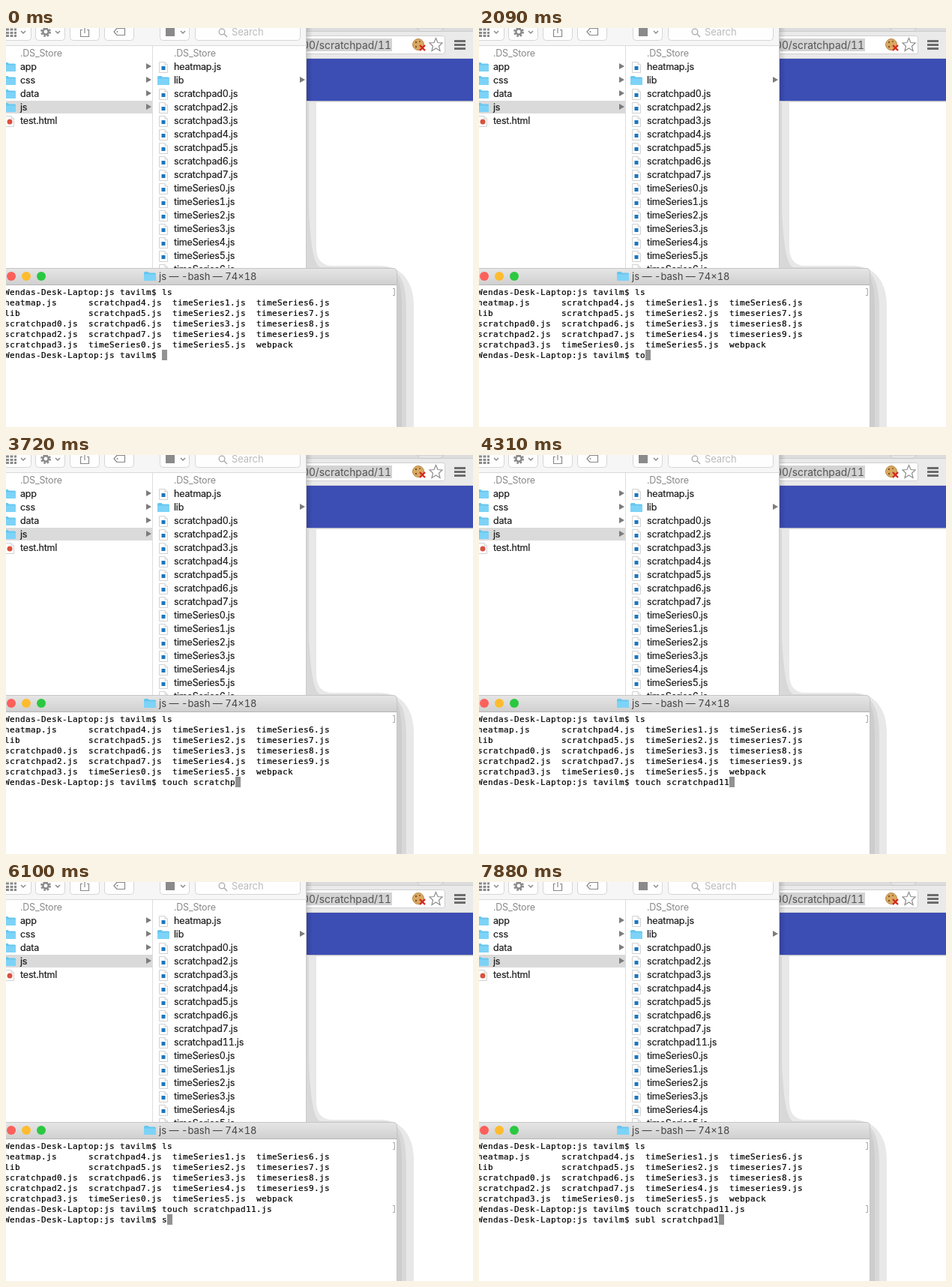
An HTML page that plays this animation: 623 px wide and 532 px high, repeating every 8000 ms.

```html
<!DOCTYPE html>
<html lang="en">
<head>
<meta charset="utf-8">
<title>Creating a file from the terminal</title>
<style>
  html, body { margin: 0; width: 100%; height: 100%; overflow: hidden; background: #fff; }
  #stage { position: relative; width: 623px; height: 532px; overflow: hidden; }
  svg { position: absolute; left: 0; top: 0; }
  text {
    font: 12.5px Inter, Roboto, sans-serif; font-variant-numeric: tabular-nums;
    letter-spacing: -.17px; white-space: pre; fill: #1c1c1c; stroke: #1c1c1c; stroke-width: .2px;
  }
  text.dim { fill: #888; stroke: none; }
  text.search { font-size: 13px; letter-spacing: -.1px; fill: #bbb; stroke: none; }
  text.address { font-size: 13.8px; letter-spacing: 0; fill: #555; stroke: none; }
  text.title { font-size: 13px; letter-spacing: 0; fill: #444; stroke: none; }
  pre {
    position: absolute; left: -2px; top: 346px; margin: 0; color: #000;
    font: 11px/14px "DejaVu Sans Mono", "Liberation Mono", monospace;
    -webkit-text-stroke: .2px #000;
  }
  #cursor { position: absolute; width: 7px; height: 14px; background: #929292; }
</style>
</head>
<body>
<div id="stage">
  <svg width="623" height="532" viewBox="0 0 623 532">
    <defs>
      <linearGradient id="bar" x2="0" y2="1">
        <stop stop-color="#e6e6e6"/><stop offset="1" stop-color="#d0d0d0"/>
      </linearGradient>
      <linearGradient id="shade">
        <stop stop-opacity=".14"/><stop offset="1" stop-opacity="0"/>
      </linearGradient>
      <clipPath id="list"><rect y="24" width="400" height="296"/></clipPath>
      <g id="folder">
        <path d="M0 1.5Q0 0 1.5 0H5.5L7 1.5H14.5Q16 1.5 16 3V10.5Q16 12 14.5 12H1.5Q0 12 0 10.5Z" fill="#66c6ef"/>
        <path d="M0 3.500H16V10.5Q16 12 14.5 12H1.5Q0 12 0 10.5Z" fill="#7dd3f7"/>
      </g>
      <g id="page">
        <path d="M.5.5H8L11.5 4V14.5H.5Z" fill="#fff" stroke="#d2d2d2"/>
        <path d="M8 .5V4H11.5" fill="#eee" stroke="#d2d2d2"/>
      </g>
      <g id="script"><use href="#page"/><rect x="3.5" y="6" width="5" height="5" fill="#1c76bd"/></g>
      <path id="arrow" d="M0 0L7 4L0 8Z" fill="#7c7c7c"/>
      <path id="chevron" d="M0 0L3 3L6 0" fill="none" stroke="#8a8a8a" stroke-width="1.5"/>
    </defs>

    <!-- browser -->
    <rect x="401" width="222" height="41" fill="#eaeaea"/>
    <rect x="401" width="222" height="4" fill="#dcdcdc"/>
    <path d="M401 4.5H623" stroke="#cdcdcd"/>
    <path d="M548 0L552 4.5H580L584 0Z" fill="#e4e4e4" stroke="#c6c6c6"/>
    <rect x="390.500" y="10.500" width="195" height="24" rx="3" fill="#fff" stroke="#d0d0d0"/>
    <rect x="401" y="14" width="114" height="17" fill="#d3d3d3"/>
    <text class="address" x="514" y="28" text-anchor="end">00/scratchpad/11</text>
    <circle cx="550" cy="22" r="7.500" fill="#d9a961" stroke="#b98a50"/>
    <g fill="#805226"><circle cx="547" cy="19" r="1.200"/><circle cx="552" cy="18" r="1"/><circle cx="547" cy="25" r="1.200"/></g>
    <path d="M552 23L559 30M559 23L552 30" stroke="#d5281e" stroke-width="2.400"/>
    <path d="M573.500 13.500L576 19.500L582 20L577.500 24.200L579 30.500L573.500 27L568 30.500L569.500 24.200L565 20L571 19.500Z" fill="#fff" stroke="#8d8d8d" stroke-width="1.200"/>
    <path d="M598 17.500H613M598 22.500H613M598 27.500H613" stroke="#6c6c6c" stroke-width="3"/>
    <path d="M401 40.500H623" stroke="#d2d2d2"/>
    <rect x="401" y="41" width="222" height="56" fill="#3c4db4"/>
    <path d="M401 97.500H623" stroke="#b9bbc6"/>
    <path d="M401 98.500H623" stroke="#e3e3e3"/>

    <!-- window shadows -->
    <path d="M401 99H414V294Q415 316 434 317H500Q527 318 538 341Q544 352 544 372V532H401Z" fill="#e8e8e8"/>
    <path d="M401 99H404V240Q407 318 420 319H508Q528 324 532 350Q534 360 534 380V532H401Z" fill="#d8d8d8"/>
    <path d="M521 330Q528 344 528 370V532H521Z" fill="#cdcdcd"/>
    <rect x="401" width="8" height="97" fill="url(#shade)"/>

    <!-- file browser -->
    <rect width="401" height="320" fill="#fff"/>
    <rect width="401" height="23" fill="#f6f6f6"/>
    <path d="M0 23.500H401" stroke="#dadada"/>
    <path d="M400.500 0V320" stroke="#cacaca"/>
    <g fill="#fefefe" stroke="#d6d6d6">
      <rect x="-20.500" y="-10.500" width="54" height="27" rx="4"/>
      <rect x="39.500" y="-10.500" width="39" height="27" rx="4"/>
      <rect x="85.500" y="-10.500" width="39" height="27" rx="4"/>
      <rect x="131.500" y="-10.500" width="39" height="27" rx="4"/>
      <rect x="205.500" y="-10.500" width="39" height="27" rx="4"/>
      <rect x="252.500" y="-10.500" width="140" height="27" rx="4"/>
    </g>
    <g fill="none" stroke="#8a8a8a" stroke-width="1.200">
      <path d="M0 2H14M0 6.500H14M0 10.500H14" stroke-width="3" stroke-dasharray="4 1.500"/>
      <circle cx="53" cy="5" r="5.700" stroke-width="2.500" stroke-dasharray="2.500 1.980"/>
      <circle cx="53" cy="5" r="3.700" stroke-width="2.500"/>
      <path d="M102 2.500H99.500V11.500H110.500V2.500H108M105 7V0"/>
      <path d="M144 5L148 .500H158.500V9.500H148Z" stroke-linejoin="round"/>
    </g>
    <circle cx="148.500" cy="5" r="1" fill="#8a8a8a"/>
    <rect x="213" width="12" height="11" fill="#8a8a8a"/>
    <use href="#chevron" x="20" y="4"/>
    <use href="#chevron" x="66" y="4"/>
    <use href="#chevron" x="233" y="4"/>
    <circle cx="288" cy="5" r="3.800" fill="none" stroke="#aaa" stroke-width="1.300"/>
    <path d="M291 8L295 12" stroke="#aaa" stroke-width="1.500"/>
    <text class="search" x="301" y="10">Search</text>

    <g clip-path="url(#list)">
      <rect y="97" width="196" height="17" fill="#dadada"/>
      <path d="M195.500 24V320" stroke="#dedede"/>
      <g id="left"></g>
      <g id="right"></g>
    </g>

    <!-- terminal -->
    <path d="M0 320H516Q522 320 522 326V532H0Z" fill="#fff"/>
    <path d="M0 320H516Q522 320 522 326V342H0Z" fill="url(#bar)"/>
    <path d="M0 320.500H516Q521.500 320.500 521.500 326V532" fill="none" stroke="#c6c6c6"/>
    <path d="M0 342.500H521" stroke="#b4b4b4"/>
    <circle cx="7" cy="331" r="6" fill="#fc605b"/>
    <circle cx="27" cy="331" r="6" fill="#fdbc2f"/>
    <circle cx="47" cy="331" r="6" fill="#2bc841"/>
    <use href="#folder" x="184" y="325"/>
    <text class="title" x="204" y="336">js — -bash — 74×18</text>
    <path id="mark" d="M516 347.500H518.500V356.500H516" fill="none" stroke="#a8a8a8"/>
    <use id="mark2" href="#mark" y="84"/>
  </svg>
  <div id="cursor"></div>
  <pre id="typed"></pre>
</div>

<script>
const $ = id => document.getElementById(id);
const LOOP = 8000;
const PROMPT = 'Wendas-Desk-Laptop:js tavilm$ ';
const TOUCH = 'touch scratchpad11.js', SUBL = 'subl scratchpad11.js';
const ENTER = 4750, LISTED = 4900;

// [time, command, characters shown]
const keys = [[0, '', 0], [1050, 's', 1], [1340, '', 0]];
function type(start, command, counts) {
  counts.forEach((n, i) => keys.push([start + Math.round(i * 14.72) * 10, command, n]));
}
type(2090, TOUCH, [2, 4, 5, 6]);
keys.push([2830, TOUCH, 7]);
type(3130, TOUCH, [9, 10, 11, 12, 14, 15, 16, 17]);
type(4310, TOUCH, [18, 19, 21]);
keys.push([ENTER, '', 0]);
type(6100, SUBL, [1, 3, 4]);
type(6690, SUBL, [5, 7, 8, 9, 11, 12, 14, 15]);
keys.push([7880, SUBL, 16]);

const table = [
  ['heatmap.js', 'scratchpad4.js', 'timeSeries1.js', 'timeSeries6.js'],
  ['lib', 'scratchpad5.js', 'timeSeries2.js', 'timeseries7.js'],
  ['scratchpad0.js', 'scratchpad6.js', 'timeSeries3.js', 'timeseries8.js'],
  ['scratchpad2.js', 'scratchpad7.js', 'timeSeries4.js', 'timeseries9.js'],
  ['scratchpad3.js', 'timeSeries0.js', 'timeSeries5.js', 'webpack']
];
const listing = [PROMPT + 'ls', ...table.map(r => r.map(c => c.padEnd(16)).join(''))];

function row(name, i, x) {
  const y = 34 + 18 * i;
  const isDir = !name.includes('.');
  let icon = '';
  if (isDir) icon = `<use href="#folder" x="${x - 22}" y="${y - 6}"/><use href="#arrow" x="${x < 100 ? 187 : 392}" y="${y - 5}"/>`;
  else if (name.endsWith('.js')) icon = `<use href="#script" x="${x - 20}" y="${y - 7}"/>`;
  else if (name.endsWith('.html')) icon = `<use href="#page" x="${x - 20}" y="${y - 7}"/><circle cx="${x - 14}" cy="${y + 1}" r="3.500" fill="#d8523f"/>`;
  const dim = name[0] === '.' ? ' class="dim"' : '';
  return `${icon}<text x="${x}" y="${y + 4}"${dim}>${name}</text>`;
}
const column = (names, x) => names.map((n, i) => row(n, i, x)).join('');
const series = (stem, ids) => [...ids].map(n => stem + n + '.js');

const head = ['.DS_Store', 'heatmap.js', 'lib', ...series('scratchpad', '0234567')];
const tail = series('timeSeries', '0123456');
const before = column([...head, ...tail], 224);
const after = column([...head, 'scratchpad11.js', ...tail], 224);
$('left').innerHTML = column(['.DS_Store', 'app', 'css', 'data', 'js', 'test.html'], 19);

// snap the terminal grid to 7px cells
const typed = $('typed');
typed.textContent = 'm'.repeat(100);
typed.style.letterSpacing = 7 - typed.getBoundingClientRect().width / 100 + 'px';

let shown = '';
function draw(t) {
  const [at, command, n] = keys.filter(k => k[0] <= t).pop();
  const listed = t >= LISTED;
  const state = at + '/' + listed;
  if (state === shown) return;
  shown = state;

  const lines = [...listing];
  if (t >= ENTER) lines.push(PROMPT + TOUCH);
  const line = PROMPT + command.slice(0, n);
  lines.push(line);
  typed.textContent = lines.join('\n');
  $('cursor').style.left = line.length * 7 - 2 + 'px';
  $('cursor').style.top = 345 + 14 * (lines.length - 1) + 'px';
  $('mark2').style.display = t >= ENTER ? '' : 'none';
  $('right').innerHTML = listed ? after : before;
}

const start = performance.now();
function tick() {
  draw((performance.now() - start) % LOOP);
  requestAnimationFrame(tick);
}
tick();
</script>
</body>
</html>
```
